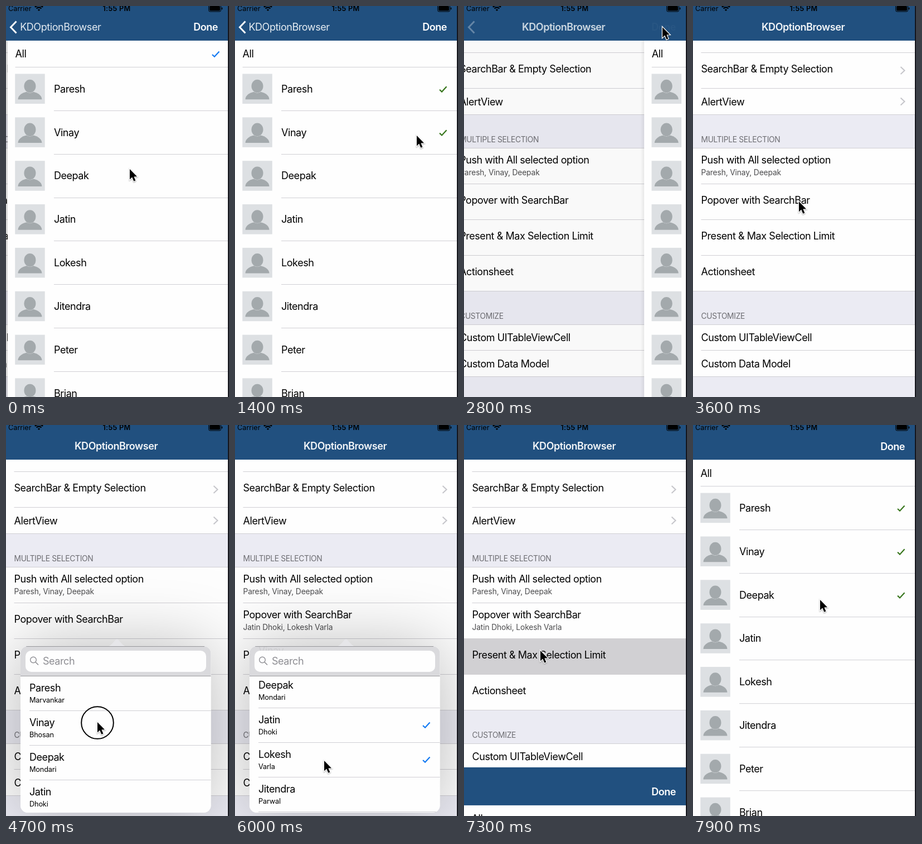
Animation, 400 px wide and 700 px high, one loop 8 s. Source, as an HTML page with a canvas:

```html
<!DOCTYPE html>
<html lang="en">
<head>
<meta charset="utf-8">
<title>Selection menu demo</title>
<style>
  html, body { margin: 0; width: 100%; height: 100%; overflow: hidden; background: #fff; }
  canvas { display: block; width: 400px; height: 700px; }
</style>
</head>
<body>
<canvas id="stage"></canvas>
<script>
const LOOP = 8000, W = 398, H = 700, NAV_BOTTOM = 62;
const NAVY = '#21507f', LINE = '#d0cfd4', GROUP = '#ebebf3', GREEN = '#38761d', BLUE = '#1279f2';
const APP = 'KDOptionBrowser';
const PEOPLE = [
  ['Paresh', 'Marvankar'], ['Vinay', 'Bhosan'], ['Deepak', 'Mondari'], ['Jatin', 'Dhoki'],
  ['Lokesh', 'Varla'], ['Jitendra', 'Parwal'], ['Peter', 'Hallow'], ['Brian', 'Stroud']
];
const FIRST_THREE = PEOPLE.slice(0, 3).map(p => p[0]).join(', ');

// Pointer stops: time, x, y
const POINTER = [
  [0, 222, 292], [100, 222, 292], [500, 325, 152], [900, 325, 152], [1200, 326, 232],
  [1400, 326, 232], [1650, 322, 313], [1900, 322, 313], [2450, 356, 38], [2900, 356, 38],
  [3500, 190, 350], [4100, 190, 350], [4500, 164, 532], [4750, 164, 532], [5100, 164, 455],
  [5250, 164, 455], [5500, 160, 540], [5700, 160, 540], [5900, 160, 601], [6350, 160, 601],
  [6650, 140, 300], [6850, 140, 300], [7150, 137, 404], [7350, 137, 404], [7850, 228, 313],
  [8000, 228, 313]
];

const canvas = document.getElementById('stage');
const ctx = canvas.getContext('2d');
const ratio = window.devicePixelRatio || 1;
canvas.width = 400 * ratio;
canvas.height = 700 * ratio;

const clamp = v => Math.max(0, Math.min(1, v));
const ramp = (t, from, to) => clamp((t - from) / (to - from));
const smooth = u => u * u * (3 - 2 * u);
const spring = (t, start) => {
  const u = Math.max(0, t - start) * 0.017;
  return 1 - (1 + u) * Math.exp(-u);
};

function rect(x, y, w, h, color) {
  ctx.fillStyle = color;
  ctx.fillRect(x, y, w, h);
}

function hline(x, y, right = W, color = LINE) {
  rect(x, y, right - x, 1, color);
}

function text(str, x, y, { size = 18, weight = 400, color = '#000', align = 'left', track = -0.44 } = {}) {
  ctx.font = `${weight} ${size}px Inter, Roboto, sans-serif`;
  ctx.letterSpacing = track + 'px';
  ctx.textAlign = align;
  ctx.fillStyle = color;
  ctx.fillText(str, x, y + size * 0.36);
}

function path(points, color, width) {
  ctx.beginPath();
  points.forEach(([x, y]) => ctx.lineTo(x, y));
  ctx.strokeStyle = color;
  ctx.lineWidth = width;
  ctx.stroke();
}

function roundRect(x, y, w, h, r, color) {
  ctx.beginPath();
  ctx.roundRect(x, y, w, h, r);
  ctx.fillStyle = color;
  ctx.fill();
}

function layer(draw, x = 0, y = 0, alpha = 1) {
  ctx.save();
  ctx.translate(x, y);
  ctx.globalAlpha *= alpha;
  draw();
  ctx.restore();
}

const check = (x, y, color) =>
  path([[x - 6, y + 1], [x - 2, y + 4.8], [x + 6.5, y - 4.5]], color, 2.2);

const chevron = (x, y) =>
  path([[x - 3.5, y - 6.5], [x + 3.5, y], [x - 3.5, y + 6.5]], '#c5c5ca', 2);

function avatar(y) {
  rect(13.3, y, 53.5, 53.5, '#dde0e3');
  ctx.fillStyle = '#a3a9ac';
  ctx.beginPath();
  ctx.ellipse(40, y + 45.7, 21.5, 14, 0, Math.PI, 0);
  ctx.fill();
  ctx.beginPath();
  ctx.ellipse(40, y + 22, 10.5, 11.8, 0, 0, 7);
  ctx.strokeStyle = '#dde0e3';
  ctx.lineWidth = 1;
  ctx.stroke();
  ctx.fill();
}

function drawList(checkedCount) {
  rect(0, NAV_BOTTOM, W, H, '#fefefe');
  text('All', 13.6, 86);
  if (!checkedCount) check(373, 86, BLUE);
  hline(13.6, 109);
  PEOPLE.forEach(([name], i) => {
    const y = 109.5 + i * 77.85;
    avatar(y + 12);
    text(name, 83, y + 38.7);
    if (i < checkedCount) check(373, y + 39.3, GREEN);
    hline(83, Math.round(y + 77.3));
  });
}

function menuRow(title, detail, top, highlight = 0) {
  if (highlight) rect(0, top - 1, W, 65, `rgba(209,208,211,${highlight})`);
  text(title, 14.5, top + (detail ? 20.5 : 28.8));
  if (detail) text(detail, 14.5, top + 43.5, { size: 13.8, color: '#4c4c4e', track: -0.14 });
}

function drawMenu(t) {
  const section = { size: 13.8, color: '#6d6d72', track: -0.31 };
  const picked = [[5600, 3], [5900, 4]].filter(([at]) => t >= at)
    .map(([, i]) => PEOPLE[i].join(' ')).join(', ');
  const pressed = t >= 3800 ? 1 - ramp(t, 4000, 4250) : 0;

  rect(0, NAV_BOTTOM, W, H, GROUP);
  [[62, 133], [255, 256], [571, 93]].forEach(([y, h]) => rect(0, y, W, h, '#fefefe'));
  [194, 254, 510, 570, 663].forEach(y => hline(0, y));
  [83, 147, 318, 382, 446, 616].forEach(y => hline(14.5, y));

  menuRow('SearchBar & Empty Selection', '', 84);
  chevron(376, 115.5);
  text('AlertView', 14.5, 171.5);
  chevron(376, 171);
  text('MULTIPLE SELECTION', 14.5, 239, section);
  menuRow('Push with All selected option', t < 1900 ? 'All' : FIRST_THREE, 255);
  menuRow('Popover with SearchBar', picked, 319, pressed);
  menuRow('Present & Max Selection Limit', '', 383, t >= 7250 ? 1 : 0);
  menuRow('Actionsheet', '', 447);
  text('CUSTOMIZE', 14.5, 555, section);
  text('Custom UITableViewCell', 14.5, 593.5);
  text('Custom Data Model', 14.5, 640.5);
}

function drawNav(p) {
  const center = 97 + 100.5 * p;
  rect(0, 0, W, NAV_BOTTOM, NAVY);
  layer(() => text(APP, center, 38, { weight: 600, color: '#f2f5f8', align: 'center' }), 0, 0, p);
  layer(() => {
    text(APP, center, 38, { color: '#e6edf3', align: 'center' });
  }, 0, 0, (1 - p) ** 1.5);
  layer(() => path([[18.5, 27.5], [8.5, 38], [18.5, 48.5]], '#fff', 3), 0, 0, (1 - p) ** 0.7);
  layer(drawDone, 0, 0, (1 - p) ** 2);
}

const drawDone = () => text('Done', 380, 38, { weight: 600, color: '#fff', align: 'right' });

function drawStatus() {
  text('Carrier', 4, 4.5, { size: 12.7, track: 0 });
  text('1:55 PM', 198.5, 4.5, { size: 12.7, weight: 600, align: 'center', track: 0.3 });
  [3, 6.3, 10].forEach((r, i) => {
    ctx.beginPath();
    ctx.arc(59, 9, r - (i ? 0 : 1.5), -Math.PI * 0.75, -Math.PI * 0.25);
    ctx.strokeStyle = '#000';
    ctx.lineWidth = i ? 2.2 : 3;
    ctx.stroke();
  });
  ctx.beginPath();
  ctx.roundRect(363.5, -1.5, 22, 11.5, 2.5);
  ctx.lineWidth = 1;
  ctx.stroke();
  roundRect(365, 0, 19, 8.5, 1.5, '#000');
  roundRect(386.8, 2.5, 1.5, 4, 1, '#000');
}

function drawPopover(t) {
  const scroll = 129 * smooth(ramp(t, 4740, 5400));
  ctx.save();
  ctx.shadowColor = 'rgba(0,0,0,.27)';
  ctx.shadowBlur = 120 * ratio;
  roundRect(26, 396, 341.5, 298, 13, '#fefefe');
  ctx.restore();

  ctx.beginPath();
  ctx.moveTo(184, 396.5);
  ctx.quadraticCurveTo(190, 393, 196, 385);
  ctx.quadraticCurveTo(199, 381.5, 202, 385);
  ctx.quadraticCurveTo(208, 393, 214, 396.5);
  ctx.fillStyle = '#e6e6e9';
  ctx.fill();

  ctx.save();
  ctx.beginPath();
  ctx.roundRect(26, 396, 341.5, 298, 13);
  ctx.clip();
  rect(26, 396, 342, 298, '#fefefe');
  PEOPLE.forEach(([first, last], i) => {
    const y = 450 + i * 62 - scroll;
    text(first, 42, y + 20.5);
    text(last, 42, y + 42.5, { size: 12.74, track: -0.17 });
    if ((i === 3 && t >= 5600) || (i === 4 && t >= 5900)) check(343, y + 30, BLUE);
    hline(42, y + 61, 368);
  });
  rect(26, 396, 342, 53, 'rgba(217,217,220,.95)');
  hline(36, 396, 356, '#98989c');
  hline(26, 449, 368, '#9c9ca0');
  roundRect(35, 404, 324, 38, 10, '#fefefe');
  ctx.beginPath();
  ctx.arc(49, 420.5, 5.3, 0, 7);
  ctx.strokeStyle = '#8e8e93';
  ctx.lineWidth = 1.4;
  ctx.stroke();
  path([[53, 424.5], [58, 429.5]], '#8e8e93', 1.6);
  text('Search', 66, 422.5, { color: '#8e8e93' });
  ctx.restore();
}

function pointerAt(t) {
  const i = POINTER.findIndex(([at]) => at > t);
  const [t0, x0, y0] = POINTER[i - 1], [t1, x1, y1] = POINTER[i];
  const u = smooth(ramp(t, t0, t1));
  return [x0 + (x1 - x0) * u, y0 + (y1 - y0) * u];
}

function drawPointer(t) {
  const [x, y] = pointerAt(t);
  if (t >= 4600 && t < 5150) {
    ctx.beginPath();
    ctx.arc(x, y + 1, 28.8, 0, 7);
    ctx.strokeStyle = '#000';
    ctx.lineWidth = 2;
    ctx.stroke();
  }
  layer(() => {
    ctx.beginPath();
    [[0, 0], [0, 18.5], [4.2, 14.6], [7.3, 21.8], [10.4, 20.4], [7.4, 13.4], [13, 13.2]]
      .forEach(([px, py]) => ctx.lineTo(px, py));
    ctx.closePath();
    ctx.shadowColor = 'rgba(0,0,0,.35)';
    ctx.shadowBlur = 2 * ratio;
    ctx.shadowOffsetY = ratio;
    ctx.strokeStyle = '#fff';
    ctx.lineWidth = 2.4;
    ctx.stroke();
    ctx.shadowColor = 'transparent';
    ctx.fillStyle = '#000';
    ctx.fill();
  }, x, y);
}

function draw(t) {
  ctx.setTransform(ratio, 0, 0, ratio, 0, 0);
  // 0 shows the pushed list, 1 shows the menu
  const menuShown = t < 2620 ? (t < 250 ? 0.0075 * Math.exp(-t / 50) : 0) : spring(t, 2620);
  const listX = menuShown * W;

  if (menuShown > 0) {
    layer(() => drawMenu(t), -119 * (1 - menuShown));
    rect(0, NAV_BOTTOM, W, H, `rgba(0,0,0,${0.1 * (1 - menuShown)})`);
  }
  if (menuShown < 0.999) {
    const edge = ctx.createLinearGradient(listX - 7, 0, listX, 0);
    edge.addColorStop(0, 'rgba(0,0,0,0)');
    edge.addColorStop(1, 'rgba(0,0,0,.07)');
    rect(listX - 7, NAV_BOTTOM, 7, H, edge);
    layer(() => drawList([600, 1200, 1700].filter(at => t >= at).length), listX);
  }
  drawNav(menuShown);

  const popover = ramp(t, 4000, 4250) * (1 - ramp(t, 6750, 7000));
  if (popover > 0) layer(() => drawPopover(t), 0, 0, popover);

  const modal = spring(t, 7265);
  if (modal > 0) {
    layer(() => {
      drawList(3);
      rect(0, -6, W, NAV_BOTTOM + 6, NAVY);
      drawDone();
    }, 0, 708 * (1 - modal));
  }
  drawStatus();
  rect(W, 0, 2, H, '#15161d');
  drawPointer(t);
}

function frame(now) {
  draw(now % LOOP);
  requestAnimationFrame(frame);
}
requestAnimationFrame(frame);
</script>
</body>
</html>
```
